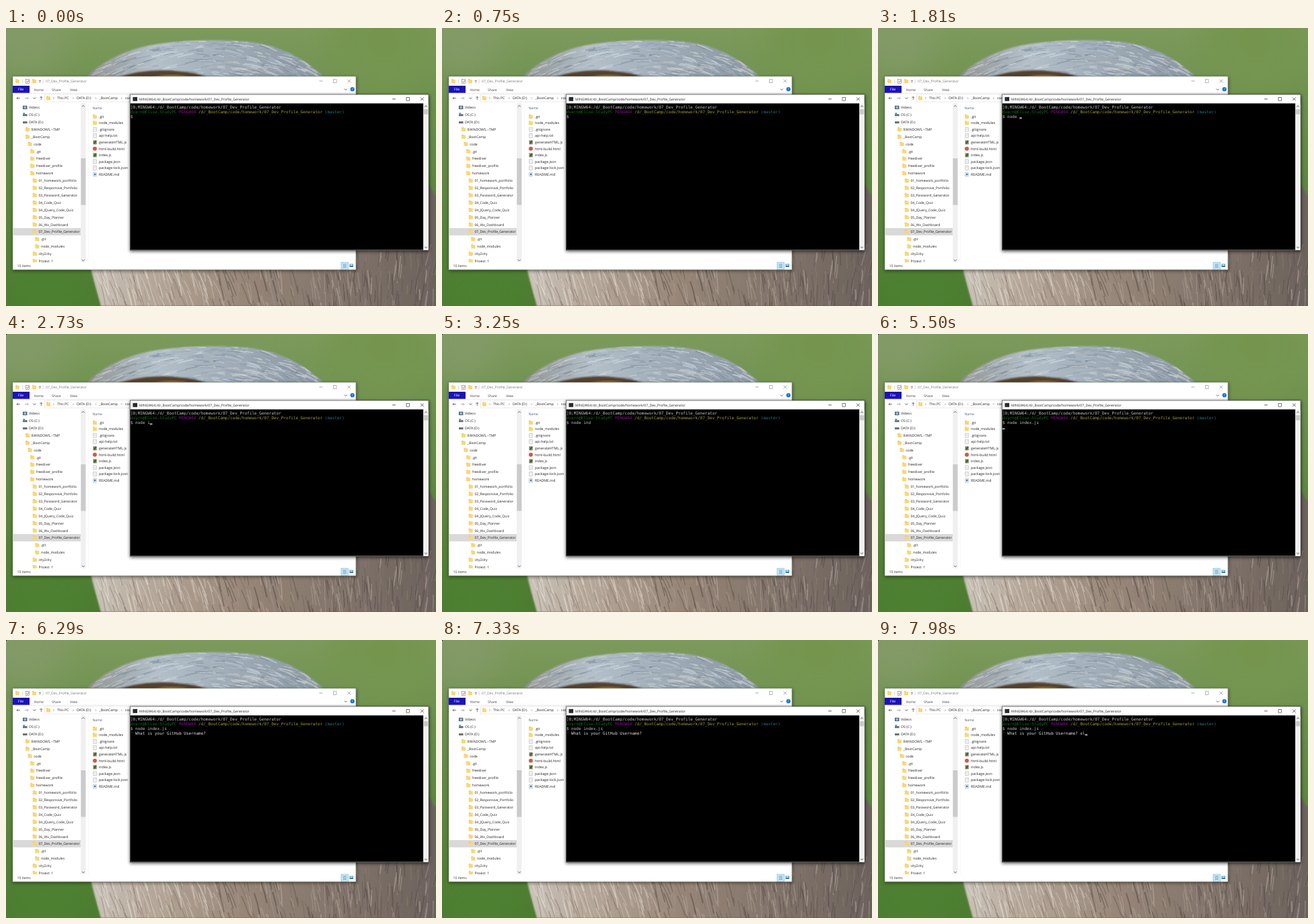
Recreate the animation shown at these times as an HTML page. Size 639 by 414 pixels, loop 8000 ms.

```html
<!DOCTYPE html>
<html lang="en">
<head>
<meta charset="utf-8">
<title>Terminal session</title>
<style>
  html, body { margin: 0; width: 100%; height: 100%; overflow: hidden; background: #5d8440; }
  svg { display: block; width: 639px; height: 414px; }
  text { font-family: "Open Sans", "Noto Sans", sans-serif; font-size: 5.1px; fill: #222; white-space: pre; text-rendering: geometricPrecision; }
  .file { font-size: 5.25px; }
  .mono { font-family: "DejaVu Sans Mono", "Liberation Mono", monospace; font-size: 6px; fill: #c4c4c4; }
</style>
</head>
<body>
<svg id="stage" viewBox="0 0 639 414" xmlns="http://www.w3.org/2000/svg">
  <defs>
    <linearGradient id="sky" x1="0" y1="0" x2="0" y2="1">
      <stop offset="0" stop-color="#7d9a5c"/><stop offset=".35" stop-color="#678d48"/><stop offset="1" stop-color="#4a7b2e"/>
    </linearGradient>
    <linearGradient id="crown">
      <stop offset="0" stop-color="#8d8f8c"/><stop offset=".3" stop-color="#b3bfc9"/><stop offset="1" stop-color="#8895a0"/>
    </linearGradient>
    <linearGradient id="chest">
      <stop offset="0" stop-color="#cbc4ba"/><stop offset=".2" stop-color="#b3a597"/><stop offset=".45" stop-color="#978678"/><stop offset="1" stop-color="#6c625d"/>
    </linearGradient>
    <filter id="soft" x="-30%" y="-30%" width="160%" height="160%"><feGaussianBlur stdDeviation="22"/></filter>
    <filter id="edge"><feGaussianBlur stdDeviation="1.2"/></filter>
    <filter id="shade"><feGaussianBlur stdDeviation="2.5"/></filter>
    <clipPath id="headClip"><path id="headShape" d="M112 86C120 64 158 41 196 30C238 18 320 15 372 22C415 29 450 50 475 76V100H112Z"/></clipPath>
    <clipPath id="chestClip"><path id="chestShape" d="M122 340L129 370L141 414H639V250L610 205L200 330Z"/></clipPath>
    <clipPath id="treeClip"><rect x="10" y="112" width="101" height="237"/></clipPath>
  </defs>
  <g id="photo"></g>
  <g id="explorer"></g>
  <g id="console"></g>
  <text id="command" class="mono" y="133.6"></text>
  <g id="question">
    <text id="mark" class="mono" y="140.6" style="fill:#075507">?</text>
    <text id="ask" class="mono" y="140.6" style="fill:#e4e4e4">What is your GitHub Username?</text>
    <text id="answer" class="mono" y="140.6"></text>
  </g>
  <rect id="cursor" width="3.6" height="1.4" fill="#e8e8e8"/>
  <rect id="dot" width="1" height="1"/>
</svg>
<script>
const $ = id => document.getElementById(id);
const LOOP = 8000, CELL = 3.612, LEFT = 184.9;
const colX = col => LEFT + col * CELL;

const rect = (x, y, w, h, fill, extra = '') => `<rect x="${x}" y="${y}" width="${w}" height="${h}" fill="${fill}" ${extra}/>`;
const frame = (x, y, w, h, fill, stroke) => rect(x, y, w, h, fill, `stroke="${stroke}" stroke-width=".6"`);
const line = (d, stroke = '#555', w = .7) => `<path d="${d}" fill="none" stroke="${stroke}" stroke-width="${w}"/>`;
const label = (x, y, s, fill = '#222', cls = '') => `<text x="${x}" y="${y + 1.8}" class="${cls}" style="fill:${fill}">${s}</text>`;
const folder = (x, y) => rect(x, y - 3, 3, 2, '#e3b94e') + rect(x, y - 2.3, 6, 5.3, '#f8d775');
const page = (x, y) => frame(x + .8, y - 3, 4.4, 6, '#fff', '#a5a5a5');
const chevron = (x, y) => line(`M${x} ${y - 1.4}l1.4 1.4l-1.4 1.4`, '#777', .6);
const arrow = (x, y, s) => line(`M${x - 2} ${y + s}l2 ${-2 * s}l2 ${2 * s}`, '#555', .9);
const buttons = (x, y, c) =>
  line(`M${x - 2.5} ${y}h5`, c) + frame(x + 18.5, y - 2.3, 4.6, 4.6, 'none', c) +
  line(`M${x + 39.5} ${y - 2.4}l4.8 4.8m0 -4.8l-4.8 4.8`, c);

let seed = 7;
const rnd = () => (seed = (seed * 16807) % 2147483647) / 2147483647;
const pick = list => list[Math.floor(rnd() * list.length)];

function feathers(count, x, y, w, h, angleAt, len, colors) {
  let out = '';
  for (let i = 0; i < count; i++) {
    const px = x + rnd() * w, py = y + rnd() * h;
    const a = angleAt(px) + (rnd() - .5) * .3, n = len * (.4 + rnd());
    const dx = Math.cos(a) * n, dy = Math.sin(a) * n;
    out += `<g opacity=".5">${line(`M${px} ${py}q${dx / 2 + 1} ${dy / 2 - 1} ${dx} ${dy}`, pick(colors), .6 + rnd() * 1.3)}</g>`;
  }
  return out;
}

function drawPhoto() {
  const glow = (x, y, r, c) => `<circle cx="${x}" cy="${y}" r="${r}" fill="${c}" filter="url(#soft)"/>`;
  return rect(0, 0, 639, 414, 'url(#sky)') +
    glow(30, 10, 60, '#829a66') + glow(560, 20, 80, '#75954f') + glow(60, 400, 60, '#4d8030') +
    '<use href="#headShape" fill="url(#crown)" filter="url(#edge)"/><g clip-path="url(#headClip)">' +
    feathers(420, 105, 15, 370, 62, x => (x - 285) / 320, 19, ['#e2e9ee', '#cbd6df', '#8496a6', '#71818e', '#b7c5d1', '#d8d5cd']) +
    '<path d="M165 74Q205 60 252 64Q285 66 306 76Z" fill="#55422f" filter="url(#edge)"/>' +
    '<path d="M215 74Q245 65 278 74Z" fill="#9b713b" filter="url(#edge)"/></g>' +
    '<use href="#chestShape" fill="url(#chest)" filter="url(#edge)"/><g clip-path="url(#chestClip)">' +
    feathers(150, 125, 345, 190, 65, () => 1.25, 30, ['#ded8d0', '#c9bcae', '#a28f7e', '#e8e3dc', '#8b7868']) +
    feathers(270, 300, 320, 345, 90, x => 1.2 + (x - 300) / 700, 30, ['#aa9c90', '#594e47', '#8e7d70', '#bfb4ab', '#675a51', '#4d4643']) + '</g>';
}

// leading spaces give the depth
const tree = `Videos
OS (C:)
DATA (D:)
 $WINDOWS.~TMP
 _BootCamp
  code
   .git
   freediver
   freediver_profile
   homework
    01_homework_portfolio
    02_Responsive_Portfolio
    03_Password_Generator
    04_Code_Quiz
    04_JQuery_Code_Quiz
    05_Day_Planner
    06_Wx_Dashboard
    07_Dev_Profile_Generator
     .git
     node_modules
    city2city
    Project_1`.split('\n');
const files = '.git node_modules .gitignore api-help.txt generateHTML.js html-build.html index.js package.json package-lock.json README.md'.split(' ');

function treeRow(row, i) {
  const name = row.trimStart(), level = row.length - name.length;
  const y = 118.3 + i * 10.9, x = 34 + level * 3.6;
  let icon = folder(x - 8.6, y);
  if (i === 0) icon = rect(25, y - 2.6, 6.4, 5.2, '#4a5560') + rect(26.3, y - 1.8, 3.8, 3.6, '#8fb9d6');
  else if (level === 0) icon = rect(25, y - 1, 6.6, 3, '#6a6f74') + (i === 1 ? rect(25.5, y - 3, 2.4, 2, '#2f9bdc') : '');
  return icon + label(x, y, name);
}

function fileRow(name, i) {
  const y = 132 + i * 9.55, x = 129;
  let icon = page(x, y);
  if (i < 2) icon = folder(x, y);
  else if (name.endsWith('.js')) icon += rect(x + .8, y - 2.6, 4.8, 5.2, '#71804b') + line(`M${x + 1.8} ${y + 2}l3 -4`, '#26301c', 1);
  else if (name.endsWith('.html')) icon = `<circle cx="${x + 3}" cy="${y}" r="3" fill="#d95545"/>`;
  else if (name.endsWith('.md')) icon += rect(x + 1.8, y - 1.4, 2.6, 2.8, '#2d83c4');
  else icon += line(`M${x + 1.8} ${y - 1}h2.4m-2.4 1.5h2.4`, '#bbb', .5);
  return icon + label(138, y, name, '#222', 'file');
}

function drawExplorer() {
  const crumb = (x, s) => chevron(x - 6, 104.5) + label(x, 104.5, s);
  const shell = rect(10, 73, 511, 289, '#000', 'opacity=".45" filter="url(#shade)"') + frame(10, 72, 510, 288, '#fff', '#7f8a7a');
  const titleBar = folder(14, 79.3) + line('M24.7 76.5v6M55 76.5v6', '#aaa', .5) +
    frame(29.5, 76.3, 5, 6, '#fff', '#777') + line('M30.5 79.5l1.4 1.4l2.2 -3', '#c0433a', .8) +
    folder(39, 79.3) + line('M48.8 78.5h3.2m-2.6 2h2', '#444') +
    label(59, 79.3, '07_Dev_Profile_Generator', '#777') + buttons(468, 79, '#888');
  const ribbon = rect(10, 86, 25, 10.8, '#1b13b4') + label(18, 91.5, 'File', '#fff') +
    label(41.5, 91.7, 'Home', '#444') + label(68, 91.7, 'Share', '#444') + label(95, 91.7, 'View', '#444') +
    arrow(504.8, 91.5, -1) + '<circle cx="514.8" cy="91.2" r="3.1" fill="#1b6fc6"/>' + label(513.5, 91.2, '?', '#fff') +
    line('M10 97.2H520', '#e0e0e0');
  const address = line('M21 104.5h-5m2 -2l-2 2l2 2M52.3 107.2v-5.2m-2 2l2 -2l2 2', '#444') +
    line('M28 104.5h5m-2 -2l2 2l-2 2', '#999') + arrow(42.5, 104.5, -.8) +
    frame(57.5, 99, 440, 11, 'none', '#dcdcdc') + folder(60, 104.5) +
    crumb(76, 'This PC') + crumb(105, 'DATA (D:)') + crumb(138.5, '_BootCamp') + crumb(177, 'code');
  const sidebar = rect(10, 298, 101, 10.8, '#d9d9d9') +
    `<g clip-path="url(#treeClip)">${tree.map(treeRow).join('')}</g>` +
    rect(111, 112, 7.5, 237, '#f0f0f0') + rect(111.3, 194, 7, 69.5, '#cbcbcb') + arrow(114.8, 116.3, 1) + arrow(114.8, 345.8, -1);
  const list = line('M122.5 112V349', '#eee', .5) + label(128.5, 119.3, 'Name', '#4c607a') + files.map(fileRow).join('');
  const status = label(16.5, 354.3, '10 items', '#333') + frame(498, 349, 10.5, 10.2, '#cce8f7', '#5fb0dc') +
    line('M500.5 352h5.5m-5.5 2.2h5.5m-5.5 2.2h5.5', '#5b7484') +
    rect(510.5, 351.5, 5.5, 4.5, '#2d7fae') + rect(511.3, 352.2, 3.9, 1.6, '#d3ecf7');
  return shell + titleBar + ribbon + address + sidebar + list + status;
}

function drawConsole() {
  const path = '/d/_BootCamp/code/homework/07_Dev_Profile_Generator';
  const run = (col, y, s, c) => `<text class="mono" x="${colX(col)}" y="${y}" style="fill:${c}">${s}</text>`;
  return rect(184, 100, 445, 233, '#000', 'opacity=".6" filter="url(#shade)"') +
    frame(184.3, 99, 443.7, 232, '#fff', '#333') +
    rect(188.5, 102.8, 6.6, 6, '#252b30') + label(198, 106, 'MINGW64:' + path) + buttons(576.5, 105.8, '#222') +
    rect(184.7, 112.3, 435.6, 218.2, '#000') +
    rect(620.3, 112.3, 7.3, 218.2, '#f0f0f0') + rect(620.5, 121, 7, 7.5, '#c9c9c9') + arrow(624, 116.6, .9) + arrow(624, 326.6, -.9) +
    run(0, 119.5, ']0;MINGW64:' + path, '#c4c4c4') +
    run(0, 126.5, 'dvarn@Elise-StudyPC', '#08700c') + run(20, 126.5, 'MINGW64', '#86108c') +
    run(28, 126.5, path, '#a0a02c') + run(80, 126.5, '(master)', '#187c80');
}

// moments in ms: keys of the command, keys of the answer, cursor flips
const COMMAND = 'node index.js', ANSWER = 'el';
const keys = [1280, 1410, 1540, 1670, 1810, 2730, 2860, 2990, 3380, 3650, 4840, 5100, 5370];
const answerKeys = [7850, 7980];
const flips = [230, 750, 1280, 2200, 2730, 3250, 3380, 3790, 4310, 4710, 4840, 5230, 5370, 5760, 5900, 6290, 6810, 7330, 7850];
const ENTER = 5500, ASKED = 5900, DOT = 2470;

$('photo').innerHTML = drawPhoto();
$('explorer').innerHTML = drawExplorer();
$('console').innerHTML = drawConsole();
$('command').setAttribute('x', colX(0));
$('mark').setAttribute('x', colX(0));
$('ask').setAttribute('x', colX(2));
$('answer').setAttribute('x', colX(32));

const passed = (times, t) => times.filter(m => m <= t).length;
const setShown = (id, on) => { $(id).style.visibility = on ? 'visible' : 'hidden'; };

function draw(t) {
  const typed = passed(keys, t), answered = passed(answerKeys, t);
  $('command').textContent = '$ ' + COMMAND.slice(0, typed);
  $('answer').textContent = ANSWER.slice(0, answered);
  const col = t < ENTER ? 2 + typed : t < ASKED ? 0 : 32 + answered;
  $('cursor').setAttribute('x', colX(col));
  $('cursor').setAttribute('y', t < ENTER ? 133.4 : 140.6);
  setShown('question', t >= ASKED);
  setShown('cursor', passed(flips, t) % 2);
  setShown('dot', t >= DOT);
}

const start = performance.now();
function tick() {
  draw((performance.now() - start) % LOOP);
  requestAnimationFrame(tick);
}
tick();
</script>
</body>
</html>
```
